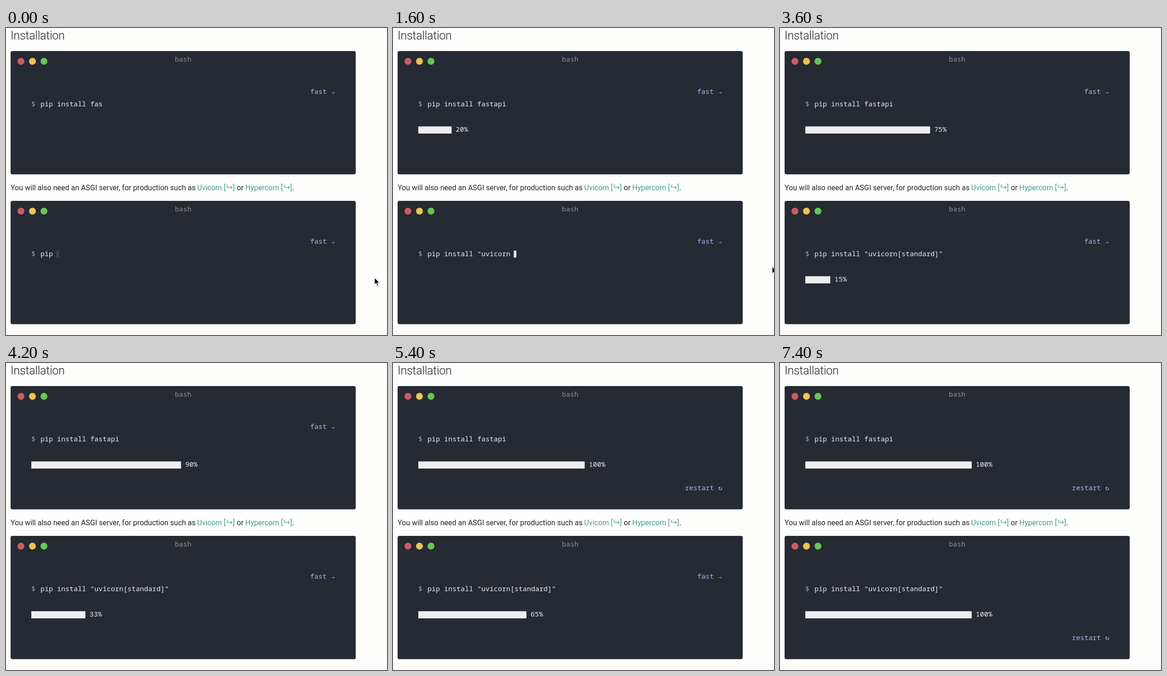
An HTML page that plays this animation: 828x666 px, repeating every 7600 ms.

```html
<!DOCTYPE html>
<html lang="en">
<head>
<meta charset="utf-8">
<title>Installation</title>
<style>
  html, body { margin: 0; width: 100%; height: 100%; overflow: hidden; background: #fefefd; }
  svg { display: block; width: 100%; height: 100%; }
  text { font: 16px Roboto, sans-serif; fill: #222326; white-space: pre; }
  .heading { font-size: 25px; font-weight: 300; letter-spacing: -.01em; }
  .link { fill: #429c8a; }
  .hook { fill: none; stroke: #429c8a; stroke-width: 1.1; }
  .term text { font: 15px "Noto Sans Mono", "DejaVu Sans Mono", monospace; fill: #eee; }
  .term .title { fill: #929292; }
  .term .prompt { fill: #a2a2a2; }
  .term .control { fill: #aeb8f2; }
  .bar, .caret { fill: #eee; }
  .caret { animation: blink 1s infinite paused; }
  @keyframes blink { 50% { opacity: 0; } }
</style>
</head>
<body>
<svg viewBox="0 0 828 666">
  <rect x=".5" y=".5" width="827" height="665" fill="#fefefd" stroke="#fcf4ea"/>
  <text class="heading" x="10" y="25">Installation</text>
  <text x="10" y="351.5">You will also need an ASGI server, for production such as</text>
  <text class="link" x="415.5" y="351.5">Uvicorn [</text>
  <text class="link" x="493" y="351.5">]</text>
  <text x="501.5" y="351.5">or</text>
  <text class="link" x="520" y="351.5">Hypercorn [</text>
  <text class="link" x="617.5" y="351.5">]</text>
  <text x="622" y="351.5">.</text>
  <path id="hook" class="hook" d="M483 340.5q-3 0-3 2.7t3 2.7h8.5m-3-3l3 3-3 3"/>
  <use href="#hook" x="124.5"/>
  <g id="terminals"></g>
  <path id="pointer" d="M0 0v14.5l3.4-3.2 2.5 6 2.4-1-2.5-5.8h4.6z" fill="#111" stroke="#fff" stroke-width=".8"/>
</svg>
<script>
const LOOP = 7600, TICK = 200, KEY_MS = 91;
const CHAR = 9, CELL = 9.04, CELLS = 40, LEFT = 55, INPUT = 75;

// typed: characters present at time 0; load: start of the progress bar
const terminals = [
  { y: 50, command: 'pip install fastapi', typed: 15.4, load: 845, done: 5200, blink: 450 },
  { y: 375, command: 'pip install "uvicorn[standard]"', typed: 3.3, load: 3008, done: 7400, blink: 300 }
];

const dot = (x, color) => `<circle cx="${x}" cy="22.3" r="7.5" fill="${color}"/>`;

document.getElementById('terminals').innerHTML = terminals.map(({ y }) => `
  <g class="term" transform="translate(0 ${y})">
    <rect x="10" width="750" height="267.5" rx="4" fill="#252a33"/>
    ${dot(32.5, '#cb5c62')}${dot(57.5, '#ecc350')}${dot(82.5, '#67c755')}
    <text class="title" x="367" y="22.5">bash</text>
    <text class="control fast" x="661" y="92.5">fast →</text>
    <text class="control restart" x="634.5" y="226">restart ↻</text>
    <text class="prompt" x="${LEFT}" y="120">$</text>
    <text class="input" x="${INPUT}" y="119.5"></text>
    <rect class="caret" y="108" width="5.6" height="15"/>
    <rect class="bar" x="${LEFT}" y="163.5" height="15.5"/>
    <text class="percent" y="175"></text>
  </g>`).join('');

document.querySelectorAll('.term').forEach((group, i) => {
  const parts = {};
  for (const name of ['fast', 'restart', 'input', 'caret', 'bar', 'percent'])
    parts[name] = group.querySelector('.' + name);
  terminals[i].parts = parts;
});

const pointer = document.getElementById('pointer');
const show = (element, visible) => element.style.display = visible ? '' : 'none';

function drawTerminal({ command, typed, load, done, blink, parts }, time) {
  const text = command.slice(0, Math.floor(typed + time / KEY_MS));
  parts.input.textContent = text;
  parts.caret.setAttribute('x', INPUT + text.length * CHAR + 7.5);
  parts.caret.style.animationDelay = -(time + blink) + 'ms';
  show(parts.caret, time < load);

  const cells = Math.max(0, Math.min(CELLS, Math.floor((time - load) / KEY_MS)));
  const width = cells * CELL;
  parts.bar.setAttribute('width', width);
  parts.percent.setAttribute('x', LEFT + width + CHAR);
  parts.percent.textContent = cells ? Math.round(cells / CELLS * 100) + '%' : '';

  show(parts.fast, time < done);
  show(parts.restart, time >= done);
}

function draw(time) {
  for (const terminal of terminals) drawTerminal(terminal, time);
  const travel = time / 1600;
  pointer.setAttribute('transform', `translate(${801 + 23 * travel} ${542 - 24 * travel})`);
  show(pointer, time < 2000);
}

const start = performance.now();
function frame() {
  const time = (performance.now() - start) % LOOP;
  draw(Math.floor(time / TICK) * TICK);
  requestAnimationFrame(frame);
}
frame();
</script>
</body>
</html>
```
